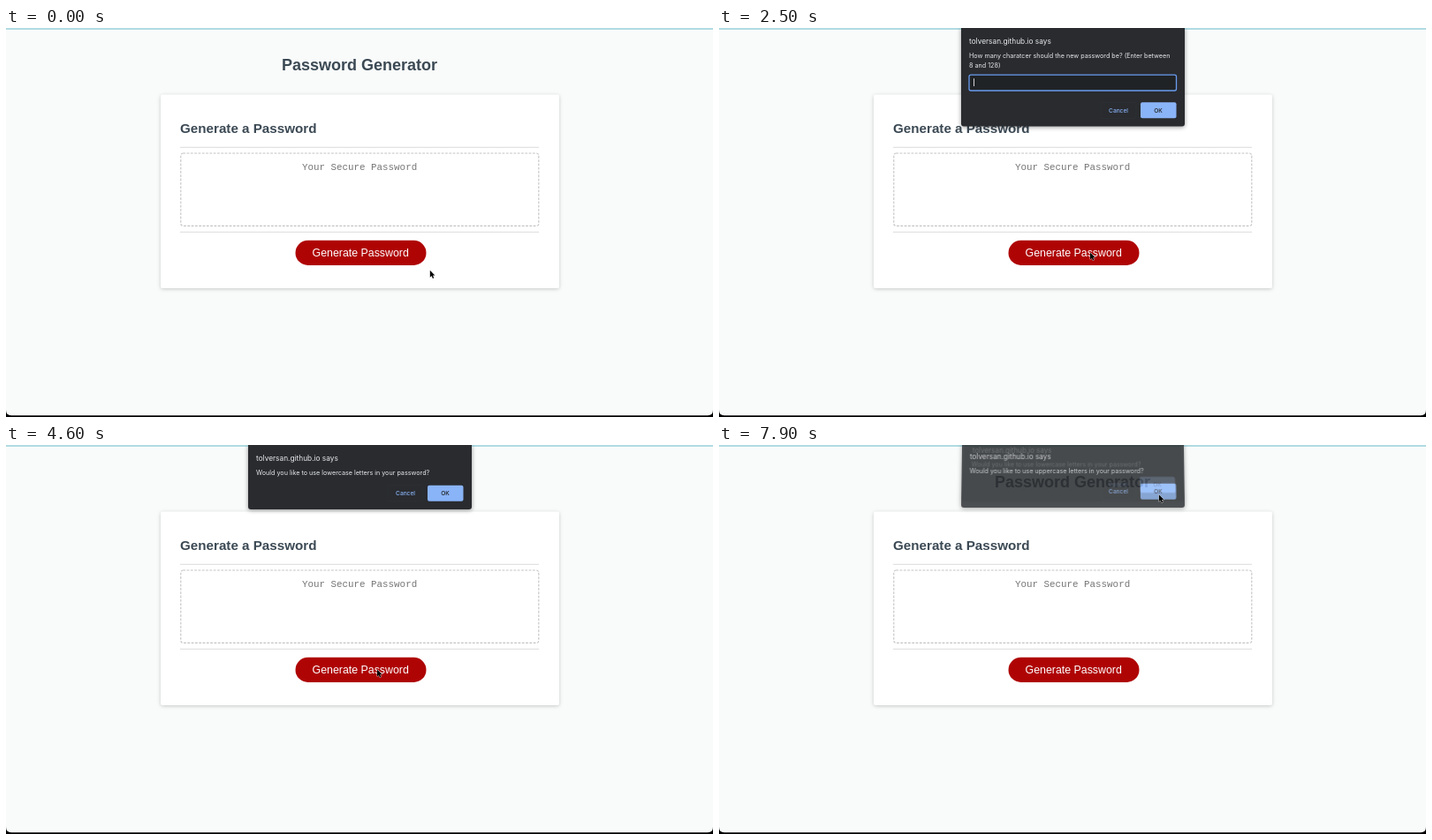
Animation of 800x441 px, one loop 8000 ms. Source, as an HTML page:

```html
<!DOCTYPE html>
<html lang="en">
<head>
<meta charset="utf-8">
<title>Password Generator</title>
<style>
  html, body { margin: 0; width: 100%; height: 100%; overflow: hidden; background: #000; }
  svg { position: absolute; left: 0; top: 0; display: block; }
  text { white-space: pre; }
  .sans { font-family: "Liberation Sans", Arial, sans-serif; }
  .bold { font-weight: 700; fill: #3b4954; }
  .mono { font-family: "Liberation Mono", "Courier New", monospace; fill: #757575; }
  .dialog { left: 274px; overflow: visible; transform-origin: 50% 100%; filter: drop-shadow(0 1.5px 2.5px rgba(0, 0, 0, .4)); }
  .dialog text { font-family: Inter, "Open Sans", sans-serif; font-size: 7.2px; fill: #e8eaed; }
  .dialog .title { font-size: 8.3px; }
  .dialog .btn { font-size: 6.6px; font-weight: 500; text-anchor: middle; }
  .card { filter: drop-shadow(0 1px 2px rgba(0, 0, 0, .2)); }
</style>
</head>
<body>
<svg width="800" height="441">
  <path d="M0 0H800V433Q800 439.2 794 439.2H6Q0 439.2 0 433Z" fill="#f9fbfb"/>
  <rect width="800" height="2" fill="#b0dbe2"/>
  <text class="sans bold" x="312" y="48" font-size="18">Password Generator</text>
  <rect class="card" x="175" y="75.5" width="451" height="219.5" rx="2" fill="#fff"/>
  <text class="sans bold" x="197" y="119" font-size="15.2">Generate a Password</text>
  <path d="M197 135.4H603M197 231.4H603" stroke="#e2e2e2" stroke-width="1.1"/>
  <rect x="197.8" y="142" width="405" height="82.4" rx="2.5" fill="#fff" stroke="#c3c3c3" stroke-width="1.1" stroke-dasharray="2.8 1.5"/>
  <text class="mono" x="335" y="161.3" font-size="10.85">Your Secure Password</text>
  <rect x="327.5" y="240.8" width="148" height="28.2" rx="14.1" fill="#af0404"/>
  <text class="sans" x="346.6" y="259.2" font-size="12.37" fill="#fff">Generate Password</text>
</svg>
<script>
const LOOP = 8000;
const HOST = 'tolversan.github.io says';

// Slide tables: [time, upward shift]; null means hidden.
const dialogs = [
  makeDialog(73, ['Would you like to use uppercase letters in your password?'], false,
    [[0, null], [7800, 10], [7900, 2]]),
  makeDialog(73, ['Would you like to use lowercase letters in your password?'], false,
    [[0, null], [4400, 10], [4500, 2], [4600, 0], [7800, 3.7], [7900, 9.5]]),
  makeDialog(111.5, ['How many charatcer should the new password be? (Enter between', '8 and 128)'], true,
    [[0, null], [1400, 10], [1500, 2], [1600, 0], [4400, 3.7], [4500, 9.5], [4600, null]])
];
const typed = [[0, ''], [3000, '2'], [3300, '20']];
const caret = [[0, 14], [2000, null], [2500, 14], [3000, 18.2], [3300, 22.2], [3900, null]];

// Pointer: [time, x, y, shape]
const pointer = [
  [0, 479.8, 274.8, 'arrow'], [100, 365, 253.6, 'hand'], [200, 447, 261.3, 'hand'],
  [600, 438, 259, 'hand'], [700, 427, 256.5, 'hand'], [800, 420, 254.5, 'hand'],
  [1300, 420, 254.5, 'arrow'],
  [5700, 423, 240, 'arrow'], [5800, 432, 205, 'arrow'], [5900, 450, 160, 'arrow'],
  [6000, 474, 118, 'arrow'], [6100, 492, 92, 'arrow'], [6200, 501, 78, 'arrow'],
  [6300, 505, 72.3, 'arrow'], [6400, 508, 68, 'arrow'], [6500, 509, 64, 'arrow'],
  [6600, 506, 58, 'arrow'], [6700, 496, 50, 'arrow'], [6800, 484, 48, 'arrow'],
  [6900, 479, 50, 'arrow'], [7000, 488, 55, 'arrow'], [7100, 497.8, 56.3, 'arrow']
];
const shapes = {
  arrow: ['M0 0V7.9L1.8 6.2L3.1 9.1L4.4 8.5L3.1 5.7H5.6Z', '#000', '#fff'],
  hand: ['M-1.2 .9Q0 -.5 1.1 .9V3.8L4 4.5Q5 4.9 4.8 6.4L4 10H-1.5L-3.8 6.3Q-3.4 5 -2 5.9L-1.2 6.5Z', '#fff', '#000']
};

function addSvg(width, height, cls, markup) {
  document.body.insertAdjacentHTML('beforeend',
    `<svg class="${cls}" width="${width}" height="${height}">${markup}</svg>`);
  return document.body.lastElementChild;
}

function makeDialog(height, lines, hasInput, slide) {
  const top = height - 27.2;
  const body = lines.map((line, i) => `<text x="9" y="${34.2 + i * 11.2}">${line}</text>`).join('');
  const input = hasInput ? `
    <rect class="field" x="9" y="53.2" width="234.5" height="17.8" rx="2" fill="#202326" stroke-width="1.3"/>
    <text class="value" x="13.8" y="64.4" style="font-size:6.7px"></text>
    <rect class="caret" y="57.2" width=".8" height="8.8" fill="#fff"/>` : '';
  const el = addSvg(253, height, 'dialog', `
    <path d="M0 0H253V${height - 3}q0 3 -3 3H3q-3 0 -3 -3Z" fill="#292b2f"/>
    <text class="title" x="9" y="18">${HOST}</text>${body}${input}
    <rect x="158" y="${top}" width="40" height="18" rx="2" fill="none" stroke="#2f3236" stroke-width=".7"/>
    <text class="btn" x="178" y="${top + 11.4}" style="fill:#8ab4f8">Cancel</text>
    <rect class="ok" x="203" y="${top}" width="40.5" height="18" rx="2" fill="#8ab4f8"/>
    <text class="btn" x="223" y="${top + 11.4}" style="fill:#202124">OK</text>`);
  return { el, height, slide };
}

const cursor = addSvg(800, 441, 'cursor', '<path stroke-width=".7" stroke-linejoin="round" paint-order="stroke"/>').firstElementChild;
const [, lower, ask] = dialogs;
const field = ask.el.querySelector('.field');
const value = ask.el.querySelector('.value');
const bar = ask.el.querySelector('.caret');
const ok = lower.el.querySelector('.ok');

function at(table, t) {
  let row = table[0];
  for (const next of table) if (next[0] <= t) row = next;
  return row;
}

// Tilt the top edge away while the sheet slides and fades.
function place({ el, height, slide }, t) {
  const shift = at(slide, t)[1];
  el.style.visibility = shift === null ? 'hidden' : 'visible';
  if (shift === null) return;
  const tilt = .0043 * shift;
  el.style.opacity = 1 - .085 * shift;
  el.style.transform = shift
    ? `matrix3d(1,0,0,0, 0,${1 + .7 * tilt},0,${-tilt / height}, 0,0,1,0, 0,${-shift},0,1)`
    : 'none';
}

function draw(t) {
  for (const d of dialogs) place(d, t);

  const closing = t >= 4400;
  field.setAttribute('stroke', closing ? '#303338' : '#6a9cf0');
  value.textContent = at(typed, t)[1];
  const x = at(caret, t)[1];
  bar.setAttribute('x', x ?? 0);
  bar.setAttribute('opacity', x === null ? 0 : 1);
  ok.setAttribute('fill', t >= 7700 ? '#9abefa' : '#8ab4f8');

  const [, px, py, shape] = at(pointer, t);
  const [d, fill, stroke] = shapes[shape];
  cursor.setAttribute('d', d);
  cursor.setAttribute('fill', fill);
  cursor.setAttribute('stroke', stroke);
  cursor.setAttribute('transform', `translate(${px} ${py})`);
}

const start = performance.now();
function tick() {
  draw((performance.now() - start) % LOOP);
  requestAnimationFrame(tick);
}
tick();
</script>
</body>
</html>
```
